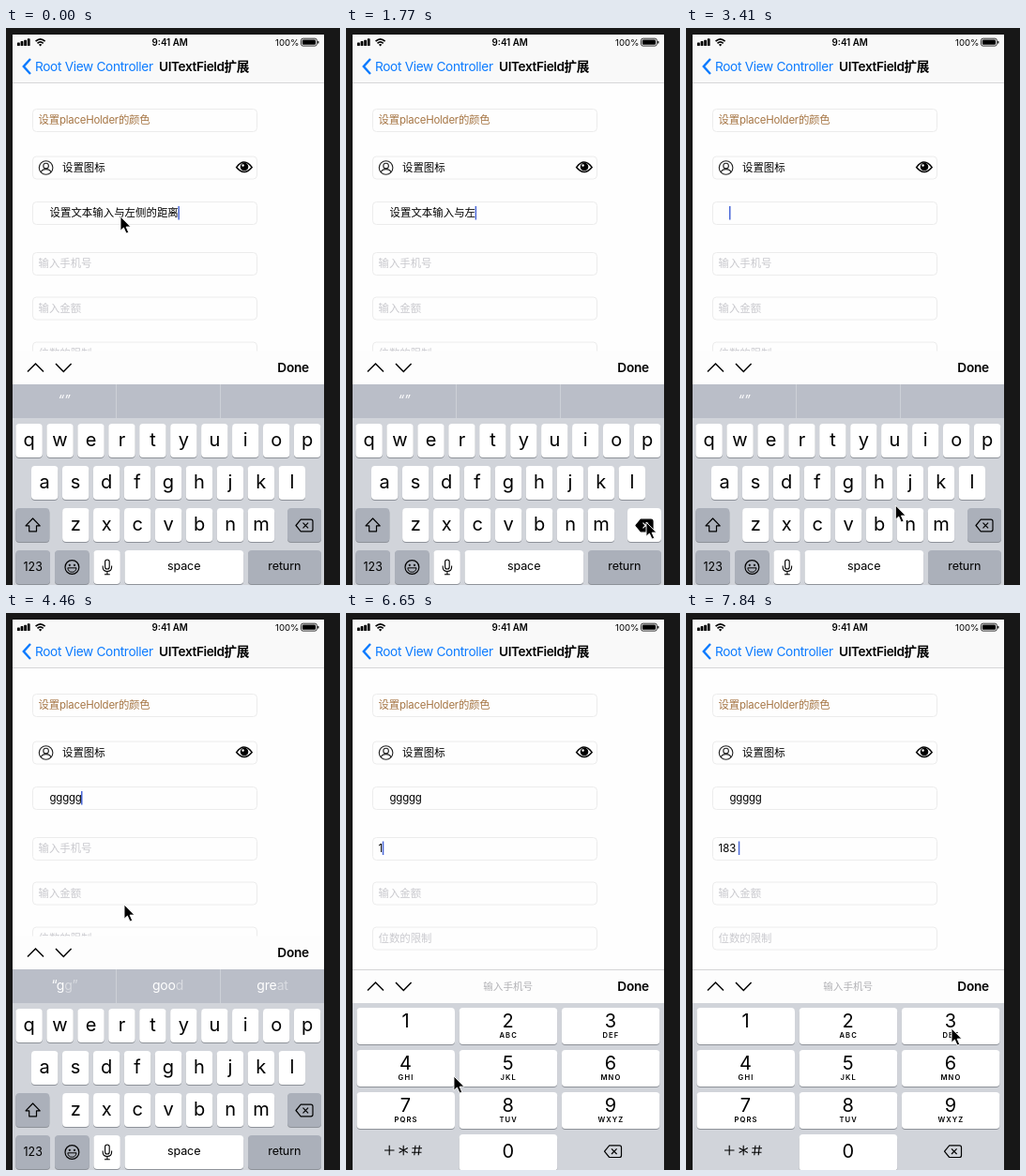
Animation, 356 px wide and 594 px high, one loop 7990 ms. Source, as an HTML page:

```html
<!DOCTYPE html>
<html lang="zh-CN">
<head>
<meta charset="utf-8">
<title>UITextField扩展</title>
<style>
html, body { margin: 0; width: 100%; height: 100%; overflow: hidden; background: #171717; }
svg { display: block; font-family: Inter, "Noto Sans CJK SC", "Noto Sans CJK", sans-serif; }
</style>
</head>
<body>
<svg id="stage" width="356" height="594" viewBox="0 0 356 594"></svg>
<script>
const LOOP = 7990, TICK = 148;
const GREY = '#c9c9ce', SPECIAL = '#abb0ba', PHRASE = '设置文本输入与左侧的距离';

const text = (x, y, s, size, fill = '#000', more = '') =>
  `<text x="${x}" y="${y}" font-size="${size}" fill="${fill}" ${more}>${s}</text>`;
const mid = (x, y, s, size, fill, more = '') =>
  text(x, y, s, size, fill, 'text-anchor="middle" ' + more);
const rect = (x, y, w, h, fill, more = '') =>
  `<rect x="${x}" y="${y}" width="${w}" height="${h}" fill="${fill}" ${more}/>`;
const line = (d, width = 1.4, color = '#000', more = '') =>
  `<path d="${d}" fill="none" stroke="${color}" stroke-width="${width}" ${more}/>`;
const key = (x, y, w, h, fill = '#fff', id = '') =>
  rect(x, y + 1, w, h, '#8e9299', 'rx="4"') + rect(x, y, w, h, fill, `rx="4" ${id && `id="${id}"`}`);
const backspace = (dx, dy, id) => `<g id="${id}" transform="translate(${dx} ${dy})" stroke="#000" fill="none"
  stroke-width="1.2" stroke-linejoin="round"><path d="M309 530.5l5.2-6.3h10.8q2 0 2 2v8.6q0 2-2 2h-10.8z"/>
  <path d="M316.5 527.7l5.6 5.6m0-5.6l-5.6 5.6"/></g>`;

function statusBar() {
  let s = '';
  for (let i = 0; i < 4; i++) s += rect(12 + i * 3.6, 15.5 - i * 1.4, 2.8, 3.5 + i * 1.4, '#000', 'rx=".6"');
  s += line('M31.6 14.2q5-4.6 10 0', 1.7) + line('M33.5 16.3q3.1-2.8 6.2 0', 1.6) +
    '<path d="M34.9 17.7q1.7-1.5 3.4 0l-1.7 1.8z"/>';
  s += mid(174.7, 18.9, '9:41 AM', 9.8, '#000', 'font-weight="600"') + text(287, 18.9, '100%', 9.6);
  s += rect(314.5, 11.2, 16.8, 7.9, 'none', 'rx="2" stroke="#000" stroke-width=".8"') +
    rect(315.8, 12.5, 14.2, 5.3, '#000', 'rx="1"') + rect(332.2, 13.8, 1.2, 2.8, '#000', 'rx=".6"');
  return s;
}

function page() {
  let s = rect(7, 7, 332, 587, '#fefefe') + rect(7, 7, 332, 51, '#f9f9f9') + rect(7, 58, 332, 1, '#d6d6d8');
  s += statusBar() + line('M26 33l-7.2 8 7.2 8', 2.4, '#0a7aff');
  s += text(31, 45.7, 'Root View Controller', 13.63, '#0a7aff', 'letter-spacing="-.31"');
  s += text(163, 45.7, 'UITextField扩展', 13.63, '#000', 'font-weight="600" letter-spacing="-.4"');
  for (const y of [86.5, 137, 185.5, 239.5, 287, 335])
    s += rect(28.5, y, 239, 24, '#fefefe', 'rx="4" stroke="#ececec"');
  s += text(34.5, 102, '设置placeHolder的颜色', 11.4, '#a67645', 'letter-spacing="-.2"');
  // person and eye icons
  s += '<circle cx="42.6" cy="149" r="7.3" fill="none" stroke="#222" stroke-width="1.1"/>' +
    '<circle cx="42.6" cy="147" r="2.8" fill="none" stroke="#222" stroke-width="1.1"/>' +
    line('M37.2 154q.8-3.4 5.4-3.4t5.4 3.4', 1.1, '#222');
  s += text(60, 152.6, '设置图标', 11.4);
  s += line('M245.6 148.6q8.2-11 16.6 0q-8.4 10-16.6 0z', 1.5) +
    '<circle cx="254" cy="148" r="4.3"/><circle cx="252.6" cy="146.5" r="1.2" fill="#fff"/>';
  s += text(46.5, 201.4, '', 11.4, '#000', 'id="third"') + text(34.5, 255.2, '', 11.4, '#000', 'id="phone"');
  s += text(34.5, 302.6, '输入金额', 11.4, GREY) + text(34.5, 350.6, '位数的限制', 11.4, GREY);
  return s + rect(0, 0, 1.5, 14.5, '#4a68d8', 'id="caret"');
}

const toolbar = () => '<g id="bar">' + rect(7, 344.5, 332, 36, '#fdfdfd') +
  rect(7, 344, 332, 1, '#d4d4d6', 'id="barLine"') +
  line('M23 366.5l8.5-8.5 8.5 8.5M53 358l8.3 8.5 8.3-8.5', 1.5) +
  mid(172.7, 366.3, '输入手机号', 10.6, '#b2b2b6', 'id="barTitle"') +
  text(289.3, 367, 'Done', 13.63, '#000', 'font-weight="600" letter-spacing="-.25"') + '</g>';

function letters() {
  let s = rect(7, 380, 332, 214, '#d1d4da') + rect(7, 380, 332, 36, '#babec8') +
    rect(117, 380, 1, 36, '#cdd0d7') + rect(228, 380, 1, 36, '#cdd0d7');
  s += mid(62, 402, '“”', 14, '#fff', 'id="noGuess" font-style="italic"');
  const guess = (x, a, b) => mid(x, 402, `${a}<tspan fill-opacity=".45">${b}</tspan>`, 14, '#fff', 'letter-spacing="-.2"');
  s += '<g id="guesses">' + guess(62.5, '“g', 'g”') + guess(172.5, 'goo', 'd') + guess(284, 'gre', 'at') + '</g>';
  ['qwertyuiop', 'asdfghjkl', 'zxcvbnm'].forEach((row, r) => [...row].forEach((c, i) => {
    const x = [24.6, 41.2, 74.3][r] + i * 32.95, y = 422 + r * 45;
    s += key(x - 14.2, y, 28.4, 36) + mid(x, y + 23.7, c, 20);
  }));
  s += key(10.3, 512, 36, 36, SPECIAL) + line('M28.6 523l7.6 7.8h-3.7v6h-7.8v-6h-3.7z', 1.2, '#000', 'stroke-linejoin="round"');
  s += key(300, 512, 36, 36, SPECIAL, 'delKey') + backspace(0, 0, 'delIcon');
  s += key(10.3, 557, 36.7, 36, SPECIAL) + mid(28.7, 579, '123', 12.4);
  s += key(52, 557, 36.7, 36, SPECIAL) + '<circle cx="70.4" cy="575" r="7.4" fill="none" stroke="#000" stroke-width="1.2"/>' +
    '<circle cx="67.8" cy="572.8" r="1.1"/><circle cx="73" cy="572.8" r="1.1"/>' + line('M65.8 575.8h9.2q-.6 4.4-4.6 4.4t-4.6-4.4z', 1);
  s += key(93.4, 557, 28.4, 36) + rect(105.6, 567, 4.6, 10, 'none', 'rx="2.3" stroke="#000" stroke-width="1.1"') +
    line('M103.2 573.5v1.6q0 4.4 4.7 4.4t4.7-4.4v-1.6M107.9 579.5v3.2M105 582.7h5.8', 1.1);
  s += key(126.5, 557, 126.7, 36) + mid(189.7, 578.3, 'space', 12.6, '#000', 'letter-spacing="-.15"');
  s += key(258, 557, 78, 36, SPECIAL) + mid(296.8, 578.3, 'return', 12.6, '#000', 'letter-spacing="-.15"');
  return `<g id="letters">${s}</g>`;
}

function numbers() {
  let s = rect(7, 416, 332, 178, '#d1d4da');
  const labels = ['', 'ABC', 'DEF', 'GHI', 'JKL', 'MNO', 'PQRS', 'TUV', 'WXYZ'];
  labels.forEach((label, i) => {
    const x = 11.5 + i % 3 * 109.2, y = 421 + (i / 3 | 0) * 45;
    s += key(x, y, 104.5, 39, '#fff', 'num' + (i + 1)) + mid(x + 52, y + 20.6, i + 1, 20) +
      mid(x + 52.5, y + 32.2, label, 7.6, '#000', 'font-weight="600" letter-spacing="1.1"');
  });
  s += key(120.7, 556, 104.5, 39) + mid(172.7, 580.8, '0', 20) + backspace(-33.5, 43.7, 'numDel');
  s += line('M41 573h10.5M46.2 567.7v10.6M61.2 567.7v10.6M56.6 570.4l9.2 5.2M65.8 570.4l-9.2 5.2' +
    'M70.5 570.8h10.5M70 575.2h10.5M74 567.7l-1.2 10.6M78.4 567.7l-1.2 10.6', 1.1);
  return `<g id="numbers">${s}</g>`;
}

const pointer = '<path id="pointer" d="M0 0v15.2l3.4-3.2 2.7 6 2.6-1.1-2.6-5.8h4.8z" stroke="#fff" stroke-width=".9"/>';
const $ = id => document.getElementById(id);
$('stage').innerHTML = page() + toolbar() + letters() + numbers() + pointer;

// pointer path: tick, x, y
const path = [
  [0, 122, 201], [1, 118, 212], [6, 303, 541], [7, 311, 535], [8, 319, 528], [9, 320, 527], [21, 320, 527],
  [24, 175, 500], [29, 172, 506], [30, 126, 311], [32, 120, 255], [35, 120, 255], [37, 108, 447], [39, 92, 441],
  [43, 98, 444], [45, 115, 494], [47, 165, 526], [48, 168, 527], [50, 294, 452], [52, 283, 443], [54, 283, 443]
];
function pointerAt(k) {
  const i = path.findIndex(p => p[0] > k), [a, ax, ay] = path[i - 1], [b, bx, by] = path[i];
  const u = (k - a) / (b - a);
  return [ax + (bx - ax) * u, ay + (by - ay) * u];
}

const show = (id, on) => $(id).setAttribute('visibility', on ? 'visible' : 'hidden');
const fill = (id, color) => $(id).setAttribute('fill', color);
const move = (id, x, y) => $(id).setAttribute('transform', `translate(${x} ${y})`);
const between = (k, a, b) => k >= a && k <= b;

function draw(k) {
  const pad = k >= 36, onPhone = k >= 33;
  const left = Math.max(0, Math.min(12, 20 - k)), gs = Math.max(0, Math.min(5, k - 24));
  $('third').textContent = PHRASE.slice(0, left) + 'g'.repeat(gs);
  $('third').setAttribute('letter-spacing', gs ? -.17 : .05);

  const digits = k >= 53 ? 3 : k >= 48 ? 2 : k >= 44 ? 1 : 0;
  $('phone').textContent = digits ? '183'.slice(0, digits) : '输入手机号';
  fill('phone', digits ? '#000' : GREY);

  if (onPhone) move('caret', [34.4, 38.8, 46.2, 55.8][digits], 243.5);
  else move('caret', 46 + left * 11.45 + gs * 6.8, 190);
  show('caret', !between(k, 3, 5) && !between(k, 40, 42));

  show('letters', !pad);
  show('numbers', pad);
  show('barTitle', pad);
  show('barLine', pad);
  move('bar', 0, pad ? 36 : 0);
  show('noGuess', !pad && k < 27);
  show('guesses', !pad && k >= 27);

  const deleting = between(k, 9, 19);
  fill('delKey', deleting ? '#fff' : SPECIAL);
  fill('delIcon', deleting ? '#000' : 'none');
  $('delIcon').lastElementChild.setAttribute('stroke', deleting ? '#fff' : '#000');
  fill('num1', k === 43 ? SPECIAL : '#fff');
  fill('num8', k === 47 ? SPECIAL : '#fff');
  fill('num3', k === 52 ? SPECIAL : '#fff');
  move('pointer', ...pointerAt(k));
}

const start = performance.now();
function frame() {
  const t = (performance.now() - start) % LOOP;
  draw(Math.min(53, Math.floor((t + 20) / TICK)));
  requestAnimationFrame(frame);
}
frame();
</script>
</body>
</html>
```
